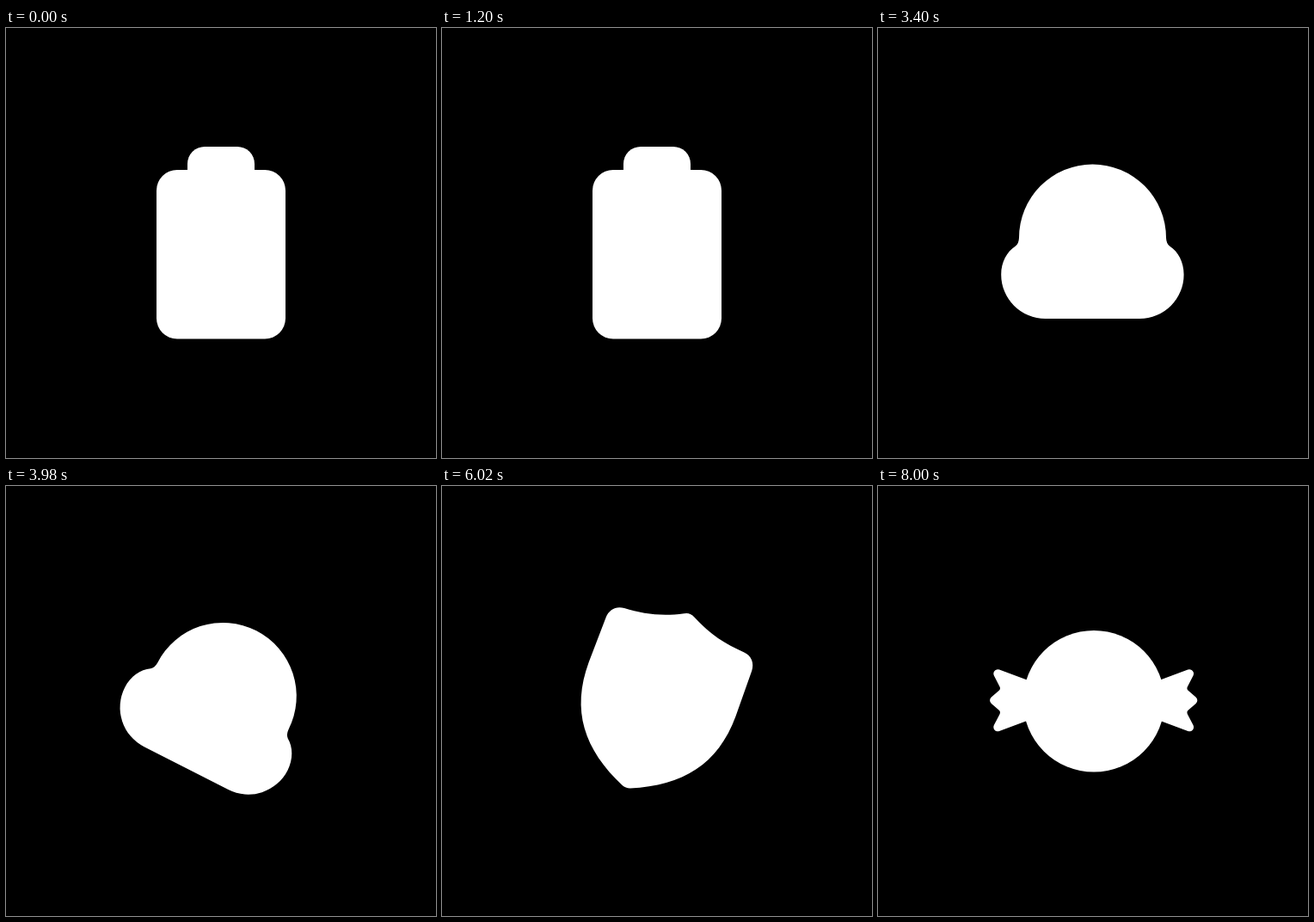
Recreate the animation shown at these times as an HTML page with a canvas. Size 500 by 500 pixels, loop 8.5 s.

```html
<!DOCTYPE html>
<html lang="en">
<head>
<meta charset="utf-8">
<title>Spinning shapes</title>
<style>
  html, body { margin: 0; width: 100%; height: 100%; overflow: hidden; background: #000; }
  canvas { display: block; width: 500px; height: 500px; }
</style>
</head>
<body>
<canvas id="stage" width="500" height="500"></canvas>
<script>
const ctx = document.getElementById('stage').getContext('2d');

const TURN = 1200;   // spinning part of each shape's slot
const SLOT = 1700;
const STEP = 20;
const BACK = 1.65;   // strength of the overshoot

function easeOutBack(p) {
  const u = p - 1;
  return 1 + (BACK + 1) * u ** 3 + BACK * u ** 2;
}

function circle(x, y, r) {
  const p = new Path2D();
  p.arc(x, y, r, 0, Math.PI * 2);
  return p;
}

function box(x, y, w, h, radii) {
  const p = new Path2D();
  p.roundRect(x, y, w, h, radii);
  return p;
}

// Polygon whose corners are given as [x, y, radius].
function roundedPoly(pts) {
  const p = new Path2D();
  p.moveTo(pts[0][0], pts[0][1]);
  for (let i = 1; i < pts.length; i++) {
    const [x, y, r] = pts[i];
    const [nx, ny] = pts[(i + 1) % pts.length];
    p.arcTo(x, y, nx, ny, r);
  }
  p.closePath();
  return p;
}

// One end of the sweet wrapper; side is 1 for right, -1 for left.
function wrapper(side) {
  const corners = [
    [60, -17.2, 0], [121.8, -40.3, 5], [107.8, -13.3, 4], [123.3, 0, 5],
    [107.8, 13.3, 4], [121.8, 40.3, 5], [60, 17.2, 0]
  ];
  return roundedPoly(corners.map(([x, y, r]) => [250.7 + side * x, 249.3 + y, r]));
}

const battery = [
  box(175, 165, 150, 196.5, 24),
  box(211, 138, 78, 50, [20, 20, 0, 0])
];

const arm = [
  circle(181.5, 218, 33.3),
  circle(306, 219, 50),
  new Path2D('M174 250L220 344C232 364 254 381.5 273 381.5C287 381.5 298 374 305 364' +
    'L384.5 244C392 232 390 216 378 207.5L333 177L306 219L277 262L268 276' +
    'C264 283 256 283.5 251.5 278.5L213 229L181 218Z')
];

const cloud = [
  new Path2D('M194.5 338A51.3 51.3 0 0 1 143.2 286.7C143.2 272 150 260 160 253.5' +
    'Q163.7 250.5 164 244A85.5 85.5 0 0 1 335 244Q335.3 250.5 339 253.5' +
    'C349 260 355.6 272 355.6 286.7A51.3 51.3 0 0 1 304.3 338Z')
];

const shield = [
  new Path2D('M244.5 143.5Q250.5 139.8 257 143.5C281 156 302 160.5 325 161.8' +
    'C335 162.5 341 169.5 341.3 179L342 235C342 295 312 332 256 356Q251 358 246 356' +
    'C190 332 160 295 160 235L160.7 179C161 169.5 167 162.5 177 161.8' +
    'C200 160.5 221 156 244.5 143.5Z')
];

const sweet = [circle(251, 250.3, 82.3), wrapper(1), wrapper(-1)];

// The arm's outline is laid out tilted, so it gets a fixed extra turn.
const shapes = [
  { parts: battery, tilt: 0 },
  { parts: arm, tilt: 56.8 },
  { parts: cloud, tilt: 0 },
  { parts: shield, tilt: 0 },
  { parts: sweet, tilt: 0 }
];

function draw(ms) {
  const t = Math.floor((ms % (SLOT * shapes.length)) / STEP) * STEP;
  const { parts, tilt } = shapes[Math.floor(t / SLOT)];
  const angle = 360 * easeOutBack(Math.min((t % SLOT) / TURN, 1)) + tilt;

  ctx.fillStyle = '#000';
  ctx.fillRect(0, 0, 500, 500);
  ctx.save();
  ctx.translate(250, 250);
  ctx.rotate(angle * Math.PI / 180);
  ctx.translate(-250, -250);
  ctx.fillStyle = '#fff';
  for (const part of parts) ctx.fill(part);
  ctx.restore();
}

let start = null;
function loop(now) {
  if (start === null) start = now;
  draw(Math.max(0, now - start));
  requestAnimationFrame(loop);
}
draw(0);
requestAnimationFrame(loop);
</script>
</body>
</html>
```
